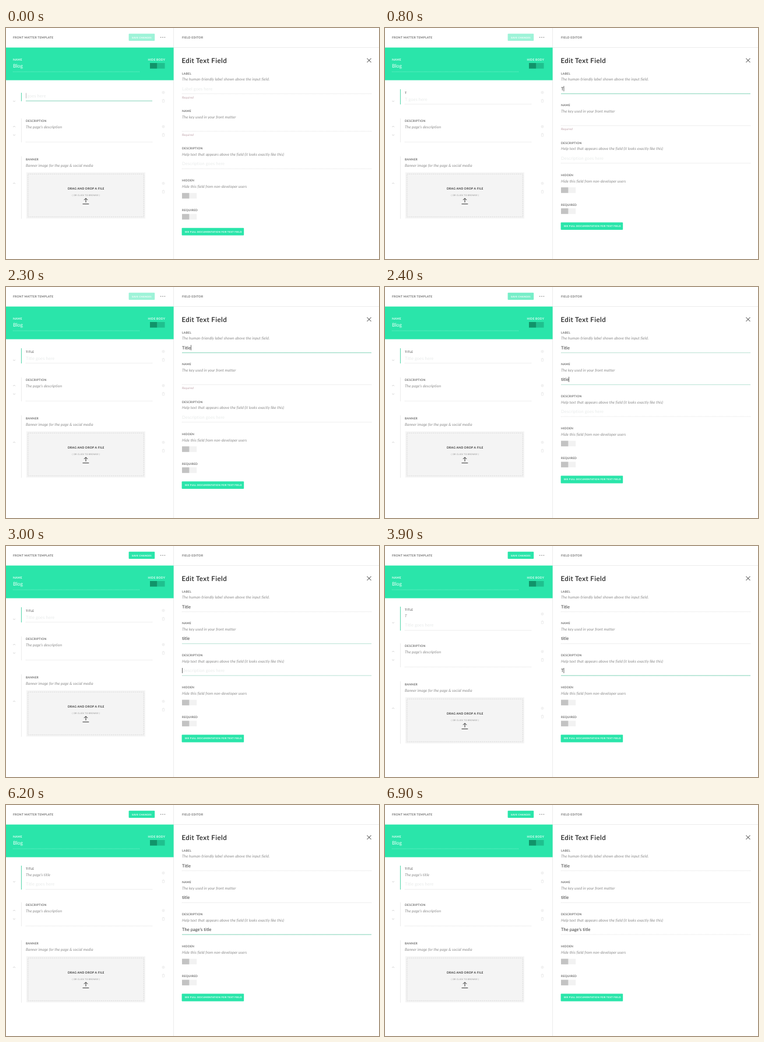
An HTML page for the animation above (7 s loop, 640 px wide and 396 px high).

```html
<!DOCTYPE html>
<html lang="en">
<head>
<meta charset="utf-8">
<title>Field editor</title>
<style>
  html, body { margin: 0; width: 100%; height: 100%; overflow: hidden; background: #fff; }
  svg { display: block; width: 100vw; height: 100vh; font-family: Lato, "Open Sans", sans-serif; text-rendering: geometricPrecision; }
  text { white-space: pre; }
  .cap { font-size: 5px; font-weight: 700; letter-spacing: .25px; fill: #6a6a6a; }
  .help { font-size: 6.6px; font-style: italic; letter-spacing: .07px; fill: #8a8a8a; }
  .value { font-size: 7.5px; letter-spacing: .06px; fill: #333; }
  .hint { font-size: 7.5px; letter-spacing: .06px; fill: #e8ebea; }
  .need { font-size: 5.3px; font-style: italic; letter-spacing: .08px; fill: #bfa3aa; }
  .btn { font-size: 4.05px; font-weight: 700; letter-spacing: .31px; fill: #fff; }
  .title { font-size: 11.6px; font-weight: 600; letter-spacing: .36px; fill: #222; }
  .white { fill: #e9fff7; }
  .rule { stroke: #d2d2d2; stroke-width: .7; stroke-dasharray: 1 1; }
  .focus { stroke: #7dd6b8; stroke-width: .9; }
  .edge { stroke: #ececec; }
  .icon { fill: none; stroke: #e4e4e4; stroke-width: .7; }
  .arrow { fill: none; stroke: #c4c4c4; stroke-width: .7; }
  .ink { fill: none; stroke: #333; stroke-width: 1; }
  .caret { fill: #444; }
  .green { fill: #2ae5aa; }
</style>
</head>
<body>
<svg viewBox="0 0 640 396" preserveAspectRatio="none">
  <defs>
    <g id="tools" class="icon">
      <circle r="2"/><circle r=".6"/>
      <path d="M-2.2 12.7h4.4M-1.6 12.7v4h3.2v-4M-.7 12v-.4h1.4v.4"/>
    </g>
    <path id="up" class="arrow" d="M-2 .8L0-.8 2 .8"/>
    <path id="down" class="arrow" d="M-2-.8L0 .8 2-.8"/>
    <g id="toggle">
      <rect width="12.5" height="9.6" fill="#c3c3c3"/>
      <rect x="13" width="12.3" height="9.6" fill="#f2f2f2"/>
    </g>
  </defs>

  <path class="edge" d="M287.5 0v396M288 33.5h352"/>

  <!-- Template panel -->
  <text class="cap" x="12" y="17.7">FRONT MATTER TEMPLATE</text>
  <g id="save">
    <rect class="green" x="210.6" y="9.8" width="44.6" height="12.3" rx="1"/>
    <text class="btn" x="216" y="17.5">SAVE CHANGES</text>
  </g>
  <g fill="#8c8c8c">
    <circle cx="265.6" cy="16" r=".85"/><circle cx="269" cy="16" r=".85"/><circle cx="272.4" cy="16" r=".85"/>
  </g>
  <rect class="green" y="33.5" width="287.6" height="56"/>
  <text class="cap white" x="12" y="55.7">NAME</text>
  <text class="white" x="12" y="68.3" font-size="8.7">Blog</text>
  <path class="rule" style="stroke:#9df5d8" d="M12 75h217"/>
  <text class="cap white" x="243.5" y="55.7">HIDE BODY</text>
  <rect x="247" y="60" width="12.5" height="9.6" fill="#11946a"/>
  <rect x="260" y="60" width="12.5" height="9.6" fill="#1fc08e"/>

  <rect id="bar" x="25.9" width="1.1" fill="#5fd8b0"/>
  <text id="leftLabel" class="cap" x="34"></text>
  <text id="leftHelp" class="help" x="34" y="121.9"></text>
  <text id="leftHint" class="hint" x="34"></text>
  <rect id="leftCaret" class="caret" x="34" y="111.5" width=".7" height="9"/>
  <g id="leftLine">
    <path class="rule" d="M34 0h217"/>
    <path id="leftFocus" class="focus" d="M34 0h217"/>
  </g>
  <g id="leftIcons">
    <use href="#tools" x="270" y="110.5"/>
    <use href="#down" x="14" y="125.5"/>
  </g>

  <g id="leftRest">
    <path class="edge" d="M26.5 155v41M26.5 220v107"/>
    <text class="cap" x="34" y="161">DESCRIPTION</text>
    <text class="help" x="34" y="172">The page's description</text>
    <path class="rule" d="M34 195.5h217"/>
    <use href="#tools" x="270" y="169"/>
    <use href="#up" x="14" y="169"/>
    <use href="#down" x="14" y="183.5"/>
    <text class="cap" x="34" y="227">BANNER</text>
    <text class="help" x="34" y="238">Banner image for the page &amp; social media</text>
    <rect x="35" y="247.5" width="204" height="79" fill="#f4f4f4"/>
    <rect x="37.8" y="250.3" width="198.6" height="73.4" fill="none" stroke="#cfcfcf" stroke-width=".7" stroke-dasharray="2 1.4"/>
    <text class="cap" style="letter-spacing:.3px;fill:#333" x="106" y="276.8">DRAG AND DROP A FILE</text>
    <text x="113.5" y="288.4" font-size="3.6" letter-spacing=".28" fill="#888">( OR CLICK TO BROWSE )</text>
    <path class="ink" d="M137 299v-6.8M133.8 295l3.2-3.2 3.2 3.2M131.5 301.7h10.8"/>
    <use href="#tools" x="270" y="266.3"/>
    <use href="#up" x="14" y="266.3"/>
  </g>

  <!-- Editor panel -->
  <text class="cap" x="302" y="17.7">FIELD EDITOR</text>
  <text class="title" x="301.5" y="60.3">Edit Text Field</text>
  <path class="ink" d="M619.5 52l7 7M626.5 52l-7 7"/>

  <text class="cap" x="302" y="79.8">LABEL</text>
  <text class="help" x="302" y="90.2">The human-friendly label shown above the input field.</text>
  <text id="labelHint" class="hint" x="302" y="106.5">Label goes here</text>
  <text id="labelText" class="value" x="302" y="106.5"></text>
  <rect id="labelCaret" class="caret" y="99.5" width=".8" height="9"/>
  <path class="rule" d="M302 112.7h325"/>
  <path id="labelFocus" class="focus" d="M302 112.7h325"/>
  <text id="labelNeed" class="need" x="302" y="120.8">Required</text>

  <g id="nameGroup">
    <text class="cap" x="302" y="144">NAME</text>
    <text class="help" x="302" y="154.6">The key used in your front matter</text>
    <text id="nameText" class="value" x="302" y="170.5"></text>
    <rect id="nameCaret" class="caret" y="163.5" width=".8" height="9"/>
    <path class="rule" d="M302 177.1h325"/>
    <path id="nameFocus" class="focus" d="M302 177.1h325"/>
    <text id="nameNeed" class="need" x="302" y="185">Required</text>
  </g>

  <g id="descGroup">
    <text class="cap" x="302" y="208.3">DESCRIPTION</text>
    <text class="help" x="302" y="219">Help text that appears above the field (it looks exactly like this)</text>
    <text id="descHint" class="hint" x="302" y="235.2">Description goes here</text>
    <text id="descText" class="value" x="302" y="235.2"></text>
    <rect id="descCaret" class="caret" y="228.2" width=".8" height="9"/>
    <path class="rule" d="M302 241.3h325"/>
    <path id="descFocus" class="focus" d="M302 241.3h325"/>
    <text class="cap" x="302" y="263.4">HIDDEN</text>
    <text class="help" x="302" y="274.2">Hide this field from non-developer users</text>
    <use href="#toggle" x="302" y="282.8"/>
    <text class="cap" x="302" y="314.2">REQUIRED</text>
    <use href="#toggle" x="302" y="318.8"/>
    <rect class="green" x="301.6" y="342.8" width="106.6" height="12.8" rx="1"/>
    <text class="btn" style="letter-spacing:.33px" x="306.7" y="350.7">SEE FULL DOCUMENTATION FOR TEXT FIELD</text>
  </g>
</svg>
<script>
  const LOOP = 7000, STEP = 100, ROW = 9.6;
  const $ = id => document.getElementById(id);
  const set = (id, attrs) => { for (const k in attrs) $(id).setAttribute(k, attrs[k]); };
  const show = (id, on) => set(id, { opacity: +on });
  const moveY = (id, y) => set(id, { transform: `translate(0 ${y})` });
  const ramp = (t, start, span = 200) => Math.min(1, Math.max(0, (t - start) / span));
  const during = (t, ...spans) => spans.some(([a, b]) => t >= a && t < b);

  const labelKeys = [800, 1300, 1500, 1700, 1900];
  const descKeys = Array.from({ length: 16 }, (_, i) =>
    i < 4 ? 3900 + i * 100 : i < 8 ? 4000 + i * 100 : 4800 + Math.floor((i - 8) / 2) * 100);
  const typed = (text, keys, t) => text.slice(0, keys.filter(k => k <= t).length);

  function field(id, text, caretOn, focus) {
    const el = $(id + 'Text');
    el.textContent = text;
    const width = text ? el.getComputedTextLength() : 0;
    set(id + 'Caret', { x: 302 + width, opacity: +caretOn });
    set(id + 'Focus', { opacity: focus });
  }

  function draw(t) {
    const label = typed('Title', labelKeys, t);
    const desc = typed("The page's title", descKeys, t);
    const named = t >= 2400;
    const grown = desc ? 1 : 0;

    field('label', label, during(t, [300, 2400]), ramp(t, 200) * (1 - ramp(t, 2300)));
    field('name', named ? 'title' : '', during(t, [2400, 3000]), ramp(t, 2300) * (1 - ramp(t, 2900)));
    field('desc', desc, during(t, [3000, 3500], [3900, 5100], [5500, 6000], [6500, 6900]),
      t < 6900 ? ramp(t, 2900) : 0);
    show('labelHint', !label);
    show('labelNeed', !label);
    show('nameNeed', !named);
    show('descHint', !desc);
    const shift = label ? -ROW : 0;
    moveY('nameGroup', shift);
    moveY('descGroup', shift - (named ? ROW : 0));
    set('save', { opacity: .45 + .55 * ramp(t, 2300, 300) });

    // The preview on the left mirrors what is typed.
    const [top, bottom, hint] = grown ? [104, 144.5, 137.7] : label ? [105, 130.5, 124.7] : [111, 125, 118.7];
    set('bar', { y: top, height: bottom - top + .5 });
    $('leftLabel').textContent = label.toUpperCase();
    set('leftLabel', { y: grown ? 110.9 : 112.8 });
    $('leftHelp').textContent = desc;
    $('leftHint').textContent = label + ' goes here';
    set('leftHint', { y: hint });
    moveY('leftLine', bottom);
    set('leftFocus', { opacity: 1 - ramp(t, 200) });
    set('leftCaret', { opacity: t < 300 ? .5 : 0 });
    moveY('leftIcons', grown * 6);
    moveY('leftRest', grown * 11.9);
  }

  let last = -1;
  function tick() {
    const t = Math.floor(performance.now() % LOOP / STEP) * STEP;
    if (t !== last) draw(last = t);
    requestAnimationFrame(tick);
  }
  tick();
</script>
</body>
</html>
```
